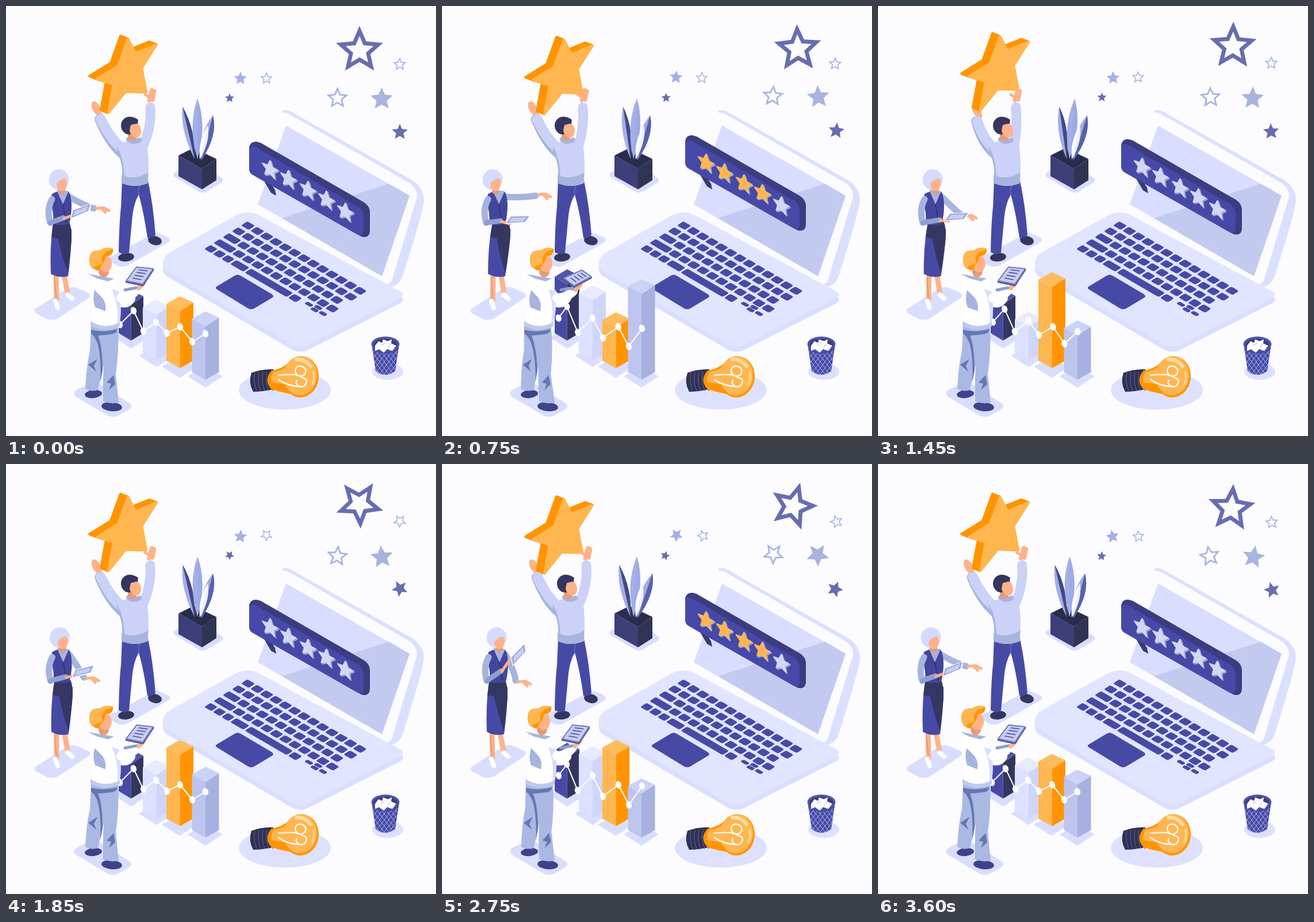
Animation of 748x748 px, one loop 3650 ms. Source, as an HTML page with a canvas:

```html
<!DOCTYPE html>
<html lang="en">
<head>
<meta charset="utf-8">
<title>Five star review</title>
<style>
html, body { margin: 0; width: 100%; height: 100%; overflow: hidden; background: #fcfcff; }
canvas { display: block; width: 748px; height: 748px; }
</style>
</head>
<body>
<canvas width="748" height="748"></canvas>
<script>
const g = document.querySelector('canvas').getContext('2d');
const LOOP = 3650, TAU = Math.PI * 2;
const PAPER = '#fcfcff', PALE = '#d9deff', MIST = '#cbd1f7', STEEL = '#a6b4de', SLATE = '#686db0',
  NAVY = '#474aa5', INK = '#34365f', SKIN = '#ffb189', GOLD = '#ffb650', AMBER = '#ff9400';
let time = 0, phase = 0, swing = 0;

// ---- time ----
const mix = (a, b, k) => a + (b - a) * k;
function keyed(at, values, p) {
  let i = at.length - 1;
  while (at[i] > p) i--;
  const k = (p - at[i]) / ((at[i + 1] ?? 1) - at[i]);
  return mix(values[i], values[(i + 1) % values.length], k * k * (3 - 2 * k));
}
const slow = (...v) => keyed([0, .205, .397, .616, .753, .877], v, time);
const fast = (...v) => keyed([0, .233, .41, .507, .753], v, phase);

// ---- drawing ----
function fill(color, d) { g.fillStyle = color; g.fill(new Path2D(d)); }
function line(color, width, d) {
  g.strokeStyle = color; g.lineWidth = width; g.lineCap = g.lineJoin = 'round';
  g.stroke(new Path2D(d));
}
function oval(color, x, y, rx, ry = rx, turn = 0) {
  g.fillStyle = color; g.beginPath(); g.ellipse(x, y, rx, ry, turn, 0, TAU); g.fill();
}
function placed(matrix, draw) { g.save(); g.transform(...matrix); draw(); g.restore(); }
const shift = (x, y, draw) => placed([1, 0, 0, 1, x, y], draw);
// Sideways lean: nothing moves at height y0, x grows by amount at height y1.
function lean(amount, y0, y1, draw) {
  const c = amount / (y1 - y0);
  placed([1, 0, c, 1, -c * y0, 0], draw);
}
const poly = pts => 'M' + pts.join('L') + 'Z';
function starPath(r, cy = 0, inner = .46) {
  return poly(Array.from({ length: 10 }, (_, i) => {
    const a = i * TAU / 10, q = i % 2 ? r * inner : r;
    return [q * Math.sin(a), cy - q * Math.cos(a)];
  }));
}

// Stars turn about the middle of their bounding box, so they also wobble.
function spinningStar(x, y, r, turns, color, hole) {
  g.save();
  g.translate(x, y);
  g.rotate(TAU * turns * time);
  fill(color, starPath(r, r * .095));
  if (hole) fill(PAPER, starPath(r * hole, r * .095));
  g.restore();
}

function skyStars() {
  spinningStar(615, 73.5, 43, -1, SLATE, .59);
  spinningStar(685, 100.5, 12.5, 1, STEEL, .65);
  spinningStar(576.5, 158.5, 20, 2, STEEL, .65);
  spinningStar(653.5, 160, 20.5, -2, STEEL);
  spinningStar(685, 218, 14.5, 3, SLATE);
  spinningStar(407.8, 125, 12, 2, '#a5afe8');
  spinningStar(453, 125, 11.5, 1, STEEL, .65);
  spinningStar(389, 159.5, 8.5, -1, SLATE);
}

function laptop() {
  fill('#dbe0ff', 'M481 182Q490 179 500 186L705 302Q728 316 727 340Q722 370 690 470Q683 488 668 488L640 470L446 345Z');
  fill(PAPER, 'M480 185L491 187L700 307Q716 317 715 332L671 478Q666 487 654 484L436 358Z');
  fill('#d9ddff', 'M487 208L702 330L654 470L438 345Z');
  fill('#c3caf0', 'M666 309L702 330L654 470L480 369Z');
  const deck = 'M281 431L400 364Q420 354 440 364L687 497Q695 502 686 508L528 588Q513 597 496 588L278 460Q266 446 281 431Z';
  shift(0, 9, () => fill('#dadfff', deck));
  fill('#e1e5ff', deck);
  fill(NAVY, 'M368 487L398 469Q403 466 408 469L462 501Q468 505 462 508L432 526Q427 529 421 526L367 493Q362 490 368 487Z');
  placed([16.2, 9.45, -16, 10.25, 421, 382], () => {
    g.fillStyle = NAVY;
    const key = (u, v, w = .83, h = .7) => {
      g.beginPath(); g.roundRect(u - .41, v - .35, w, h, .17); g.fill();
    };
    for (let v = 0; v < 4; v++) {
      const wide = v > 1 ? v - 1 : 0;
      if (wide) key(0, v, .83 + wide * .5);
      for (let u = wide ? 1 + wide * .5 : 0; u < 12.2; u++) key(u, v);
    }
    for (let u = 0; u < 3; u++) key(u * .92, 4, .76);
    key(2.78, 4, 1.4);
    key(4.35, 4, 4.5);
    key(9, 4);
    for (const [u, v] of [[10.4, 4], [11.2, 3.8], [11.2, 4.2], [12, 4.1]]) key(u, v, .68, .36);
  });
}

function bubble() {
  shift(0, -12 * swing, () => {
    fill('#393b72', 'M444 296L461 325L470 330L468 320L459 306Z');
    fill('#3b3d80', 'M423 250V246Q425 235 436 236L443 238L622 341Q632 347 633 357V392Q632 405 618 401L470 317L428 293Q423 290 423 282Z');
    fill('#4749a8', 'M423 251Q424 242 433 245L612 349Q622 355 622 366V392Q621 402 612 398L430 294Q423 290 423 282Z');
    const fade = Math.min(1, Math.max(0, (.795 - phase) / .085));
    [[459, 283], [491, 300], [525, 319], [557, 336], [590, 357]].forEach(([x, y], i) => {
      const lit = Math.min(1, Math.max(0, (phase - .025 - i * .122) / .015)) * fade;
      placed([.93, .42, -.03, 1, x, y], () => {
        const d = starPath(15, 1, .46);
        shift(2, 1, () => line('#a1a6d2', 3, d));
        for (const [color, alpha] of [['#d3d7f3', 1], [GOLD, lit]]) {
          g.globalAlpha = alpha;
          fill(color, d); line(color, 2, d);
        }
        g.globalAlpha = 1;
      });
    });
  });
}

function leaf(x, y, tx, ty, w, light, dark) {
  const mx = mix(x, tx, .55), my = mix(y, ty, .55);
  fill(light, `M${x} ${y}Q${mx - w} ${my} ${tx} ${ty}Q${mx + w} ${my} ${x} ${y}Z`);
  fill(dark, `M${x} ${y}Q${mx} ${my} ${tx} ${ty}Q${mx + w} ${my} ${x} ${y}Z`);
}

function plant() {
  fill(PALE, 'M293 290L335 268L376 300Q380 304 374 308L349 323Q342 327 334 322L294 298Q289 294 293 290Z');
  fill('#2a2c4c', 'M300 260L326 247L366 266L341 283Z');
  leaf(328, 266, fast(307, 318, 315, 308, 316), 175, 14, '#a4aee8', '#434a83');
  leaf(333, 266, fast(333, 346, 339, 339, 343), 161, 17, '#a4afe8', '#9eaae4');
  leaf(340, 268, fast(360, 368, 362, 366, 364), 190, 18, '#a0ace2', '#5962a8');
  leaf(337, 267, fast(351, 350, 351, 349, 351), 208, 11, '#fff', '#eef0ff');
  fill('#3c3f78', 'M300 260L341 283V319L300 296Z');
  fill('#303352', 'M341 283L366 266V303L341 319Z');
}

function bigStar() {
  const face = 'M212 57L225 82L262 67L236 108L244 150L208 149L178 186L187 136L158 127L195 104Z';
  shift(0, keyed([0, .25, .5, .75], [0, -5, 4.5, -5], phase), () => {
    for (let i = 13; i >= 0; i--) shift(-i, -i * .38, () => { fill(AMBER, face); line(AMBER, 4, face); });
    fill(GOLD, face); line(GOLD, 4, face);
  });
}

function starBearer() {
  fill(PALE, 'M182 436L255 397Q262 393 270 397L283 403Q288 408 281 412L210 452Q200 456 190 450L180 443Q177 439 182 436Z');
  oval(INK, 209, 437, 14, 7.5, -.1);
  oval(INK, 259, 408, 12, 8, .2);
  fill(NAVY, 'M202 304H247Q256 345 260 398Q254 405 246 403Q240 360 231 328Q221 345 219 375L214 429Q204 434 196 428Q197 375 200 350Z');
  line('#7b80cc', 1, 'M233 312Q229 320 231 330');

  const lx = fast(157, 168, 158, 160, 173), ly = fast(178, 174, 178, 178, 182);
  const rx = fast(252, 224, 246, 252, 240), ry = 155;
  oval(SKIN, lx, ly, 7, 13, -.45);
  line(SKIN, 6, `M${lx - 3} ${ly - 6}L${lx + 7} ${ly + 10}`);
  bigStar();

  const wx = mix(lx, 172, .45), wy = ly + 19;
  line(STEEL, 19, `M205 258Q182 240 ${wx} ${wy}`);
  line(MIST, 18, `M207 252Q184 236 ${wx + 1} ${wy}`);
  line(MIST, 17, `M236 249Q${rx + 2} 212 ${rx - 1} ${ry + 21}`);
  fill(MIST, 'M192 243Q212 230 244 234Q250 265 247 308Q224 318 201 308Q205 280 196 258Z');
  fill(STEEL, 'M201 294Q222 304 247 290L247 307Q224 318 201 308ZM192 243Q205 262 206 300L201 306Q205 280 196 260Z');
  line(SKIN, 7, `M${rx - 3} ${ry + 9}L${rx + 2} ${ry - 9}M${rx + 3} ${ry + 8}L${rx + 6} ${ry - 7}`);
  line(SKIN, 5, `M${rx - 2} ${ry + 4}L${rx - 10} ${ry - 1}`);

  shift(fast(0, -5, -4, 0, 0), 0, () => {
    line(STEEL, 8, 'M213 232Q222 239 232 233');
    oval('#e89a78', 220, 226, 8, 9);
    oval(INK, 215, 208, 15, 15.5);
    oval(SKIN, 225, 216, 10, 13, -.25);
    fill(INK, 'M204 199Q218 188 230 198L229 204L217 207L214 221L207 222Z');
  });
}

function woman() {
  fill(PALE, 'M52 526L107 491Q116 487 125 491L143 499Q150 504 142 509L91 543Q80 549 70 544L53 535Q47 530 52 526Z');
  const hips = slow(0, 5, 4, 0, 0, 0);
  lean(hips, 515, 395, () => {
    line(SKIN, 9, 'M87 470L88 512M101 468L107 499');
    line('#e89a78', 2, 'M84 472L88 510');
    line('#fff', 8, 'M86 513L90 525M107 502L115 509');
    fill(NAVY, 'M81 386Q76 420 78 466Q92 474 108 470Q114 425 114 388Z');
    fill('#353763', 'M82 376H110Q116 390 113 418L108 464Q98 440 91 405Q82 402 79 402Z');
  });
  const x = slow(0, 0, 1, 0, 1, 0);
  shift(x, 0, () => {
    const hx = slow(170, 180, 162, 143, 145, 177) - x, hy = slow(353, 329, 366, 382, 380, 345);
    const tx = slow(130, 132, 137, 131, 133, 129) - x, ty = slow(356, 371, 366, 355, 331, 355);
    const ex = mix(113, hx, .42), ey = mix(333, hy, .58) + 3;
    line(STEEL, 11, `M110 332Q${ex} ${ey} ${hx - 17} ${mix(ey, hy, .8)}`);
    line(SKIN, 5, `M${hx - 13} ${hy - 1}L${hx} ${hy - 2}L${hx + 9} ${hy + 3}M${hx - 3} ${hy}L${hx + 3} ${hy + 6}`);
    fill('#43469c', 'M80 327Q96 318 110 324Q118 345 110 379Q95 383 82 379Q84 360 77 340Z');
    fill(STEEL, 'M88 320L99 345L109 322Z');
    line('#34376f', 2, 'M99 345L104 376');
    line(STEEL, 11, 'M80 336Q70 355 77 377');
    line('#8fa0d0', 9, `M77 377L${tx - 30} ${ty * .35 + 244}`);
    line(SKIN, 5, `M${tx - 29} ${ty * .35 + 245}L${tx - 14} ${ty + 8}`);
    g.save();
    g.translate(tx, ty);
    g.rotate(slow(-.36, -.03, -.05, -.4, -.8, -.38));
    fill('#fff', 'M-22 7L-13 -6H23L14 7Z');
    fill('#9ba7da', 'M-20 6L-12 -5H20L12 5Z');
    fill('#c6cef5', 'M-16 4L-10 -3H15L9 4Z');
    g.restore();
  });
  shift(slow(0, -4, 3, 0, 3, 0), 0, () => {
    oval('#e89a78', 97, 320, 6, 8);
    oval('#d5dbff', 92, 302, 17.5, 18);
    oval(SKIN, 97, 309, 9, 13);
    fill('#d5dbff', 'M82 306Q84 288 98 289L108 300Q95 298 88 310Z');
  });
}

function bar(x, base, top, left, right, cap, w = 23.5) {
  const m = x + w, r = x + 2 * w;
  fill(left, poly([[x, top + 13], [m, top + 26], [m, base], [x, base - 13]]));
  fill(right, poly([[m, top + 26], [r, top + 11], [r, base - 13], [m, base]]));
  fill(cap, poly([[x, top + 13], [m, top], [r, top + 11], [m, top + 26]]));
}

function chart() {
  for (const [x, y] of [[218, 580], [262, 612], [302, 631], [347, 648]])
    fill(PALE, `M${x - 31} ${y - 4}L${x} ${y - 20}L${x + 30} ${y - 4}L${x} ${y + 16}Z`);
  bar(196, 582, slow(494, 458, 493, 500, 485, 490), NAVY, INK, '#5356a8', 21.5);
  bar(238, 616, slow(511, 486, 532, 498, 491, 502), '#dde1ff', '#cfd5fb', '#e8ebff');
  bar(279, 630, slow(505, 533, 463, 497, 480, 480), GOLD, AMBER, '#ffbb5c');
  bar(323.5, 650, slow(531, 475, 547, 507, 547, 543), '#bdc5ee', '#a6b1e0', '#cbd2f7');
  const nodes = [[198, 554, 203, 542], [222, 530, 217, 522], [239, 566, 236, 568], [261, 550, 262, 542],
    [280, 569, 280, 578], [303, 558, 307, 558], [324, 584, 325, 593], [347, 570, 348, 560]]
    .map(([a, b, c, d]) => [mix(a, c, swing), mix(b, d, swing)]);
  line('#fff', 2, 'M' + nodes.join('L'));
  for (const [x, y] of nodes) oval('#fff', x, y, 5, 6.5, -.3);
}

function phoneMan() {
  fill(PALE, 'M122 668L146 656Q153 653 161 657L215 691Q222 697 214 702L194 713Q185 717 176 712L122 680Q115 674 122 668Z');
  const hips = fast(0, 4, -5, -2, 0), head = fast(0, -8, 8, 4, 3);
  oval('#3f4288', 152, 675, 15, 7, -.1);
  oval('#3f4288', 184, 697, 18, 8, .08);
  lean(hips, 685, 560, () => {
    fill('#a9b9e3', 'M148 554Q170 568 195 556Q197 600 191 640L196 690Q182 693 169 688Q168 655 170 625L160 668Q148 672 138 666Q140 625 146 600Z');
    fill('#6577b2', 'M148 563Q168 569 193 562Q194 570 182 571Q168 573 160 573Q168 592 168 634L164 654Q166 610 159 586Q154 574 148 570Z');
    fill('#6577b2', 'M143 624L159 614L153 626L157 636ZM187 642L175 655L183 657L179 668L190 658Z');
  });

  const tip = fast(0, 1, .6, 0, 0), hx = 237 + tip * 2, hy = 485 + tip * 5;
  placed([1, 0, -(head / 2 - hips) / 95, 1, hips + (head / 2 - hips) * 560 / 95, 0], () => {
    line('#fff', 22, `M186 500Q204 522 214 508`);
    fill('#fff', 'M152 472Q176 468 192 486Q204 520 197 556Q172 570 147 554Q154 520 146 490Z');
    fill(PALE, 'M184 492Q198 525 193 560L197 556Q203 525 196 496Z');
    fill(STEEL, 'M154 494Q150 510 155 524L173 531Q175 516 167 507Z');
    fill('#c0c9ee', 'M147 548Q172 564 198 550V557Q172 570 147 556Z');
    fill(PAPER, 'M143 466L158 461L188 473L180 479L158 474Z');
    fill(STEEL, 'M143 466L164 470L188 474L178 479L158 474Z');
  });
  line('#fff', 16, `M200 508Q216 508 ${hx - 10} ${hy + 8}`);
  line('#8e9dce', 5, `M207 494L222 491L${hx - 8} ${hy + 5}`);
  line(SKIN, 7, `M${hx - 6} ${hy + 6}L${hx + 3} ${hy - 3}`);
  const corners = [[209, 478, 214, 470], [227, 454, 254, 463], [256, 457, 262, 480], [238, 484, 224, 489]]
    .map(([a, b, c, d]) => [mix(a, c, tip), mix(b, d, tip)]);
  shift(0, 2, () => { fill('#565b9c', poly(corners)); line('#565b9c', 3, poly(corners)); });
  fill('#c5ccf5', poly(corners)); line('#737ab8', 2, poly(corners));
  const along = (u, v) => [0, 1].map(i =>
    mix(mix(corners[0][i], corners[1][i], u), mix(corners[3][i], corners[2][i], u), v));
  for (const u of [.25, .45, .65, .83]) line('#4b4f91', 1.6, `M${along(u, .25)}L${along(u, .75)}`);

  shift(head, 0, () => {
    oval('#e89a78', 170, 462, 9, 10);
    oval(SKIN, 173, 448, 11, 15);
    fill(GOLD, 'M145 438Q146 424 163 425Q174 418 186 422Q188 434 174 436L170 449L161 460Q143 459 145 438Z');
    fill(AMBER, 'M174 427Q181 426 186 422Q188 434 174 435L169 449Q165 440 168 435ZM153 454Q165 449 168 446L161 460Q154 459 153 454Z');
  });
}

function bulb() {
  oval('#dde1ff', 485, 668, 80, 34);
  fill('#2f3154', 'M427 638Q445 631 465 632L468 666Q446 671 430 671Q421 655 427 638Z');
  for (let x = 433; x < 463; x += 7) line('#5b5e94', 1.2, `M${x} 637Q${x - 4} 653 ${x + 3} 669`);
  fill(AMBER, 'M462 634Q483 631 499 614L516 678Q490 675 462 667Q447 651 462 634Z');
  oval(AMBER, 513, 645, 31, 36, .1);
  oval(GOLD, 512, 643, 29, 34, .1);
  fill(GOLD, 'M466 636Q483 635 497 620L500 662Q480 656 462 655Q459 644 466 636Z');
  line('#ffdda0', 6, 'M505 615Q519 613 530 627');
  line('#ffd38c', 4, 'M535 637Q538 648 533 658');
  line('#fff', 2.2, 'M474 642Q488 641 502 641C520 650 527 634 517 628C505 622 499 635 506 641C516 649 526 646 522 656C517 669 500 659 506 651M474 650Q488 660 509 662');
}

function bin() {
  oval('#dde1ff', 664, 636, 27, 14.5);
  fill(NAVY, 'M636 588L643 635Q660 648 677 635L684 588Z');
  g.save();
  g.clip(new Path2D('M637 598Q660 612 683 598L677 635Q660 648 643 635Z'));
  for (let i = -50; i < 60; i += 8) line('#aab0ea', 1, `M${650 + i} 595l36 48M${670 + i} 595l-36 48`);
  g.restore();
  oval('#5357aa', 660, 588, 24.5, 13);
  oval('#3b3e83', 660, 589, 21, 10.5);
  fill('#fff', 'M642 591L648 583L654 586L656 580L664 583L671 580L670 587L679 591L672 600L663 597L657 603L649 597L642 600Z');
  line('#a9b0e0', 1, 'M652 591L659 586M664 594L669 588');
}

function draw() {
  time = performance.now() % LOOP / LOOP;
  phase = time * 2 % 1;
  swing = (1 - Math.cos(TAU * phase)) / 2;
  g.fillStyle = PAPER;
  g.fillRect(0, 0, 748, 748);
  for (const part of [skyStars, laptop, bubble, plant, starBearer, woman, chart, phoneMan, bulb, bin]) part();
  requestAnimationFrame(draw);
}
draw();
</script>
</body>
</html>
```
